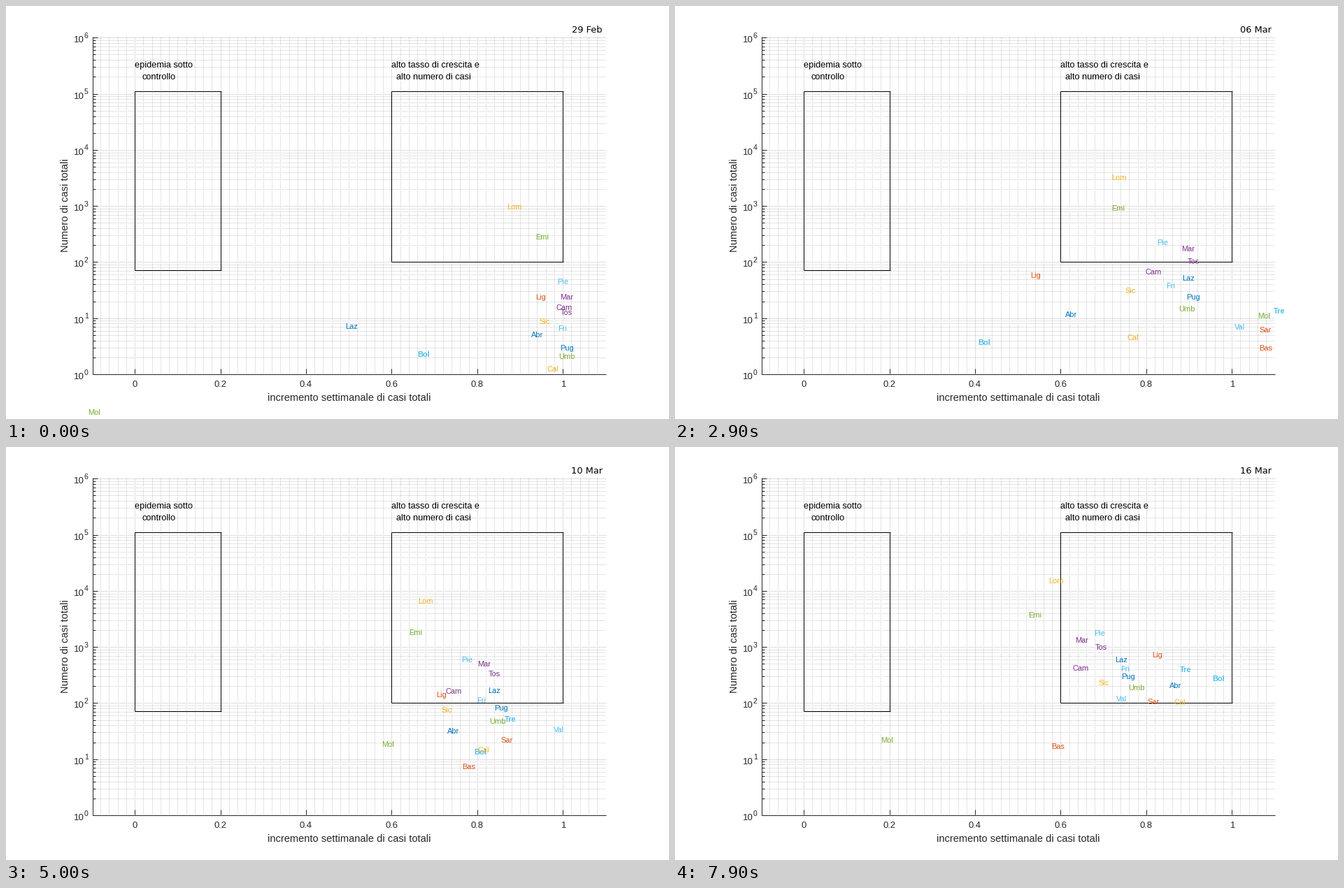
Recreate the animation shown at these times as a matplotlib script. Size 948 by 591 pixels, loop 8 s.

```python
import numpy as np
import matplotlib.pyplot as plt
from matplotlib.animation import FuncAnimation

W, H, DPI = 948, 591, 100
PX = 72 / DPI
N, STEP = 80, 100
INK, MAJOR, MINOR = "#262626", "#dedede", "#cbcbcb"
CYCLE = ["#0072bd", "#d95319", "#edb120", "#7e2f8e", "#77ac30", "#4dbeee"]
FIRST, MID, LAST = 0.8, 8, 16.6

# total cases on the first, middle and last day
CASES = {
    "Abr": (4.8, 15, 195), "Bas": (0.5, 3.9, 16), "Bol": (2.2, 5, 260),
    "Cal": (1.2, 6.3, 98), "Cam": (15, 88, 400), "Emi": (269, 1120, 3550),
    "Fri": (6.3, 52, 389), "Laz": (6.8, 76, 564), "Lig": (23, 72, 690),
    "Lom": (918, 3960, 14400), "Mar": (23, 245, 1260), "Mol": (3.2, 13, 21),
    "Pie": (43, 300, 1675), "Pug": (2.8, 35, 283), "Sar": (0.8, 9.1, 101),
    "Sic": (8.3, 40, 219), "Tos": (12, 151, 944), "Tre": (2.5, 20, 378),
    "Umb": (2, 21, 179), "Val": (0.5, 13, 113),
}
PROVINCES = "Bol", "Tre"
ONSET = {"Lom": 0.04, "Emi": 0.09}           # early growth, default 0.17
ARRIVAL = {"Bas": 0.8, "Mol": 0.8, "Sar": 0.8, "Tre": 1.3, "Val": 3.2}
STALL = {"Laz": (0.8, 0.5), "Sic": (3.2, 0.3),   # day, depth
         "Bol": (3.4, 0.95), "Lig": (4.5, 0.5)}

fig = plt.figure(figsize=(W / DPI, H / DPI), dpi=DPI, facecolor="white")
ax = fig.add_axes([0, 0, 1, 1])
ax.set(xlim=(0, W), ylim=(H, 0))
ax.axis("off")


def px(v):
    return 184.2 + 612 * v


def py(p):
    return 526 - 80.28 * p


def vert(cols, top, bottom, color=INK, **kw):
    ax.vlines(np.round(cols), top, bottom, color, linewidths=PX, **kw)


def horiz(rows, left, right, color=INK, **kw):
    ax.hlines(np.round(rows) + 1, left, right, color, linewidths=PX, **kw)


def label(x, y, s, size, color=INK, ha="center", font="Liberation Sans", **kw):
    return ax.text(x, y, s, fontsize=size * PX, color=color, ha=ha,
                   va="baseline", family=font, **kw)


def bell(u, width):
    return np.exp(-(u / width) ** 2)


def log_cases(name, t):
    curve = np.polyfit([FIRST, MID, LAST], np.log10(CASES[name]), 2)
    p = np.polyval(curve, t)
    p -= ONSET.get(name, 0.17) * np.maximum(0, FIRST - t)
    if name in ARRIVAL:
        u = t - ARRIVAL[name]
        p -= 1.2 * bell(np.maximum(u, 0), 2) + 1.5 * np.maximum(-u, 0)
    return p


def growth(name, t):
    """Share of all cases that is less than six days old."""
    g = 1 - 10 ** (log_cases(name, t - 6) - log_cases(name, t))
    if name in ARRIVAL:
        u = np.maximum(t - ARRIVAL[name], 0)
        g = g * (1 - 1.11 * bell(u, 2)) + 0.12 * bell(u - 4.6, 1.6)
    if name in STALL:
        day, depth = STALL[name]
        g -= depth * bell(t - day, 1.6)
    return g


# grid
fifths = px(np.arange(6) / 5)
decades = py(np.arange(7))
minor_x = px(np.array([c for c in range(-4, 55) if c % 10]) / 50)
minor_y = py(np.log10([m * 10 ** p for p in range(6) for m in range(2, 10)]))
dots = dict(color=MINOR, linestyles=[(0, (1, 2))], antialiased=False, zorder=1)
vert(minor_x, 44, 526, **dots)
horiz(minor_y, 124, 858, **dots)
vert(fifths, 44, 526, MAJOR, zorder=1.2)
horiz(decades, 124, 858, MAJOR, zorder=1.2)

# axes and ticks
vert([124], 44, 527, zorder=2)
horiz([526], 124, 858, zorder=2)
vert(fifths, 519, 526, zorder=2)
horiz(decades, 124, 131, zorder=2)
horiz(minor_y, 124, 128, zorder=2)
for c, x in enumerate(fifths):
    label(x, 545, f"{c / 5:g}", 13)
for p, y in enumerate(decades):
    label(111.5, y + 8, "10", 13.3, ha="right")
    label(112, y + 1.5, str(p), 10.5, ha="left")
label(491, 565, "incremento settimanale di casi totali", 14.67)
label(89, 285, "Numero di casi totali", 14.67, rotation=90,
      rotation_mode="anchor")

# highlighted zones
for x0, x1, bottom in [(184, 307, 377), (551, 796, 365)]:
    vert([x0, x1], 122, bottom + 1, "black", zorder=2.5)
    horiz([121, bottom], x0, x1 + 1, "black", zorder=2.5)
for x, y, s in [(184, 88, "epidemia sotto"), (194.5, 105, "controllo"),
                (551.5, 88, "alto tasso di crescita e"),
                (558.5, 105, "alto numero di casi")]:
    label(x, y, s, 12.8, "black", ha="left")

date = label(830.5, 38, "", 13, "black", font="DejaVu Sans")

days = FIRST + np.arange(N) / 5
regions, others = [], [n for n in CASES if n not in PROVINCES]
for name in CASES:
    bold = name in PROVINCES
    color = CYCLE[-1] if bold else CYCLE[others.index(name) % 6]
    text = label(0, 0, name, 11, color, ha="left", zorder=4,
                 weight="bold" if bold else "normal")
    regions.append((text, px(growth(name, days)),
                    py(log_cases(name, days)) + 3))


def update(i):
    day = (i + 3) // 5
    date.set_text(f"{day:02d} Mar" if day else "29 Feb")
    for text, x, y in regions:
        text.set_position((x[i], y[i]))
    return [date] + [r[0] for r in regions]


anim = FuncAnimation(fig, update, frames=N, interval=STEP, repeat=True,
                     repeat_delay=0)
plt.show()
```
